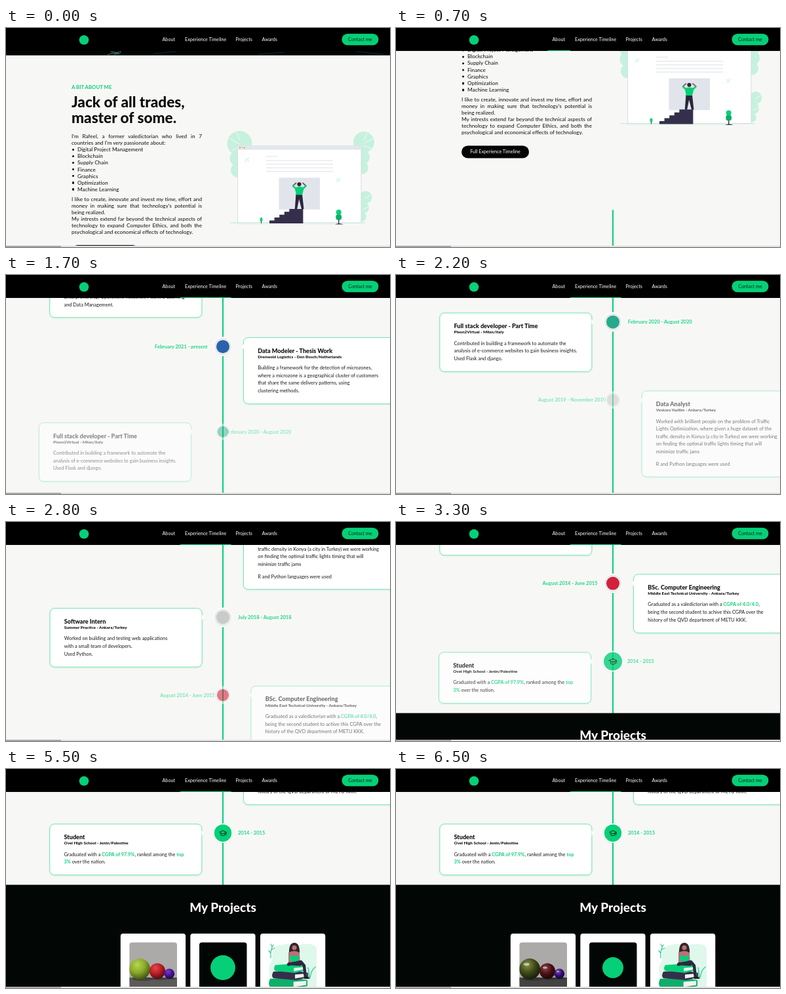
Recreate the animation shown at these times as an HTML page. Size 586 by 334 pixels, loop 6600 ms.

```html
<!DOCTYPE html>
<html lang="en">
<head>
<meta charset="utf-8">
<title>Portfolio scroll</title>
<style>
  html, body { margin: 0; width: 100%; height: 100%; overflow: hidden; background: #f7f8f6; }
  svg { display: block; width: 586px; height: 334px; }
  text, .copy { font-family: Lato, "Open Sans", sans-serif; }
  text { font-size: 7.2px; fill: #1a1a1a; }
  .copy { position: relative; font-size: 8.2px; color: #0c0c0c; }
  .copy div { position: absolute; left: 0; width: 199px; line-height: 10px; }
  .copy .full { text-align-last: justify; }
  .copy .item { left: 9px; }
  .copy .item::before { content: ""; position: absolute; left: -8px; top: 3.5px; width: 3.4px; height: 3.4px; border-radius: 50%; background: #0c0c0c; }
  .big { font-size: 22.6px; font-weight: 800; fill: #0b0b0b; }
  .title { font-size: 9.1px; font-weight: 800; fill: #0b0b0b; }
  .sub { font-size: 6.35px; font-weight: 800; fill: #0b0b0b; }
  .line { font-size: 7.4px; }
  .date { font-size: 7.5px; font-weight: 700; fill: #1fd487; }
  .hl { font-weight: 700; fill: #10cf7c; }
  .white { fill: #fff; }
</style>
</head>
<body>
<svg id="stage" viewBox="0 0 586 334" xmlns="http://www.w3.org/2000/svg"></svg>
<script>
const LOOP = 6600, GREEN = '#05d077', DARK = '#362f4b', MID = 331;

const rect = (x, y, w, h, fill, r = 0, extra = '') =>
  `<rect x="${x}" y="${y}" width="${w}" height="${h}" rx="${r}" fill="${fill}" ${extra}/>`;
const circle = (x, y, r, fill, extra = '') =>
  `<circle cx="${x}" cy="${y}" r="${r}" fill="${fill}" ${extra}/>`;
const path = (d, fill, extra = '') => `<path d="${d}" fill="${fill}" ${extra}/>`;
const stroke = (d, color, w = 1) =>
  path(d, 'none', `stroke="${color}" stroke-width="${w}" stroke-linecap="round" stroke-linejoin="round"`);
const text = (x, y, str, cls = '', extra = '') =>
  `<text x="${x}" y="${y}" class="${cls}" ${extra}>${str.replace(/\*(.+?)\*/g, '<tspan class="hl">$1</tspan>')}</text>`;

// Timeline entries alternate left and right; y is the card top on the page.
const entries = [
  { y: 443, start: 915, date: 'September 2021 - present', mark: '#c4c5c6',
    title: ['M.Sc. Computer Science and Engineering -', 'Student'], sub: 'Politecnico Di Milano - Milan/Italy',
    lines: ['Excelling in Digital Projects Management, High-Tech', 'Enterprenurship, Operations Research, Machine Learning', 'and Data Management.'] },
  { y: 573, start: 925, date: 'February 2021 - present', mark: '#2a62ad',
    title: ['Data Modeler - Thesis Work'], sub: 'Drenwold Logistics - Den Bosch/Netherlands',
    lines: ['Building a framework for the detection of microzones,', 'where a microzone is a geographical cluster of customers', 'that share the same delivery patterns, using', 'clustering methods.'] },
  { y: 703, start: 1600, date: 'February 2020 - August 2020', mark: '#27a98b',
    title: ['Full stack developer - Part Time'], sub: 'Pixon2Virtual - Milan/Italy',
    lines: ['Contributed in building a framework to automate the', 'analysis of e-commerce websites to gain business insights.', 'Used Flask and django.'] },
  { y: 822, start: 2085, date: 'August 2019 - November 2019', mark: '#c9cbca',
    title: ['Data Analyst'], sub: 'Veskara Yazilim - Ankara/Turkey',
    lines: ['Worked with brillient people on the problem of Traffic', 'Lights Optimization, where given a huge dataset of the', 'traffic density in Konya (a city in Turkey) we were working', 'on finding the optimal traffic lights timing that will', 'minimize traffic jams'],
    note: 'R and Python languages were used' },
  { y: 982, start: 2260, date: 'July 2018 - August 2018', mark: '#c9cbca',
    title: ['Software Intern'], sub: 'Summer Practice - Ankara/Turkey',
    lines: ['Worked on building and testing web applications', 'with a small team of developers.', 'Used Python.'] },
  { y: 1100.5, start: 2680, date: 'August 2014 - June 2015', mark: '#d3203c',
    title: ['BSc. Computer Engineering'], sub: 'Middle East Technical University - Ankara/Turkey',
    lines: ['Graduated as a valedictorian with a *CGPA of 4.0/4.0*,', 'being the second student to achive this CGPA over the', 'history of the QVD department of METU KKK.'] },
  { y: 1219.5, start: 3120, date: '2014 - 2015',
    title: ['Student'], sub: 'Ovel High School - Jenin/Palestine',
    lines: ['Graduated with a *CGPA of 97.9%*, ranked among the *top*', '*3%* over the nation.'] }
];

function entry(e, i) {
  const right = i % 2, x = right ? 362.5 : 66.8, tx = x + 21.7;
  const shift = (e.title.length - 1) * 10.5;
  const height = 54.2 + shift * 0.95 + 11.7 * (e.lines.length + (e.note ? 1 : 0)) + (e.note ? 6.5 : 0);
  const edge = right ? 363 : 298.5, tip = right ? -4 : 4;
  const nodeY = e.y + 13.7;
  const lineY = n => e.y + shift + 48.6 + n * 11.65;
  const icon = e.mark ? circle(0, 0, 10, e.mark) :
    path('M-5.4-1.2 0-3.8 5.4-1.2 0 1.3z', 'none', 'stroke="#0a2a1c" stroke-width="1"') +
    stroke('M-3.2 .5v2.8Q0 5 3.2 3.3V.5M5-.8v3.4', '#0a2a1c', 1);
  return `<g id="card${i}">
    ${rect(x, e.y, 232, height, '#fff', 7, 'stroke="#74dfb3" stroke-width=".9" filter="url(#glow)"')}
    ${path(`M${edge} ${nodeY - 4}l${tip} 4l${-tip} 4z`, '#fff')}
    ${e.title.map((s, n) => text(tx, e.y + 23.2 + n * 10.5, s, 'title')).join('')}
    ${text(tx, e.y + 31.4 + shift, e.sub, 'sub')}
    ${e.lines.map((s, n) => text(tx, lineY(n), s, 'line')).join('')}
    ${e.note ? text(tx, lineY(e.lines.length) + 7, e.note, 'line') : ''}
    ${text(right ? 307.5 : 354, nodeY + 2.6, e.date, 'date', right ? 'text-anchor="end"' : '')}
  </g>
  <g id="node${i}" data-y="${nodeY}">
    ${circle(0, 0, 14.8, '#fff', 'filter="url(#soft)"')}${circle(0, 0, 13.2, e.mark ? '#e9eaea' : GREEN)}${icon}
  </g>`;
}

function about() {
  const row = (y, str, cls = '') => `<div class="${cls}" style="top:${y - 5}px">${str}</div>`;
  const items = ['Digital Project Management', 'Blockchain', 'Supply Chain', 'Finance', 'Graphics', 'Optimization', 'Machine Learning'];
  const copy = [
    row(165, "I'm Rafeel, a former valedictorian who lived in 7", 'full'),
    row(175, "countries and I'm <i>very</i> passionate about:"),
    ...items.map((s, i) => row(185.2 + i * 10.1, s, 'item')),
    row(261, 'I like to create, innovate and invest my time, effort and', 'full'),
    row(271, "money in making sure that technology's potential is", 'full'),
    row(281, 'being realized.'),
    row(291, 'My intrests extend far beyond the technical aspects of', 'full'),
    row(301, 'technology to expand Computer Ethics, and both the', 'full'),
    row(311, 'psychological and economical effects of technology.')
  ].join('');
  return text(100, 92.8, 'A BIT ABOUT ME', 'hl', 'style="font-size:7.8px"') +
    text(100, 121, 'Jack of all trades,', 'big') + text(100, 145, 'master of some.', 'big') +
    `<foreignObject x="100" y="0" width="210" height="330"><div class="copy" xmlns="http://www.w3.org/1999/xhtml">${copy}</div></foreignObject>` +
    rect(100, 331, 103, 19, '#050505', 9.5) +
    text(151.5, 342.6, 'Full Experience Timeline', 'white', 'text-anchor="middle"');
}

function illustration() {
  const pale = '#c5f1de';
  const sprig = (x, y) => stroke(`M${x - 3} ${y + 3}l6-6M${x - 2.5} ${y - 2}l2 2M${x + 2.5} ${y + 2}l-2-2`, '#d8f5e9', 1.5);
  let steps = 'M402 298';
  for (let i = 0; i < 5; i++) steps += `V${293.5 - i * 4.4}h${i < 4 ? 7.6 : 21}`;
  return [
    circle(356.5, 176, 19, pale), circle(353, 199, 11.5, pale), circle(354, 217, 11, pale),
    circle(546, 174, 16, pale), circle(544, 197, 11, pale), circle(543, 213, 10, pale),
    circle(549, 258, 9.5, pale), circle(545, 274, 9, pale), circle(543, 288, 7, pale),
    stroke('M341 168l15 9M344 187l12-5M351 158l6 13M561 168l-13 7M558 184l-12-4M551 160l-5 11M557 254l-9 6M553 273l-8 4', '#f7f8f6', 1),
    rect(342, 296.5, 206, 1.6, pale, 0.8), rect(352, 299, 152, 0.8, '#d8f5e8'),
    rect(353.5, 179.5, 188.5, 117.5, '#fff', 2, 'stroke="#d5d8df" stroke-width=".9"'),
    rect(353.5, 179.3, 188.5, 6.4, '#e4e6ed', 2),
    circle(357, 182.5, 0.9, '#f55f56'), circle(360.3, 182.5, 0.9, '#f5b93e'), circle(363.6, 182.5, 0.9, '#41c955'),
    rect(397, 195.2, 18, 1.5, '#e8eaee'),
    ...[201.5, 207, 212.5, 218].map(y => rect(397, y, 102, 1.5, '#e8eaee')),
    sprig(368, 201), sprig(507, 232),
    rect(416.5, 228.3, 62.5, 48.5, '#e1e4eb'),
    path(steps + 'V298z', DARK),
    path('M442.5 253h9.5l2.5 23h-3.5l-3.8-15-3 15h-3.4z', '#29273b'),
    stroke('M438 240.5l4.5-4M457.5 240.5l-4.5-4', '#8e5448', 1.8),
    stroke('M442.5 245l-4.5-4M453 245l4.5-4', GREEN, 2.6),
    path('M440.5 243.5q7-3 14.5 0l-3 11h-9z', GREEN), circle(447.5, 238.3, 3.1, '#29273b'),
    rect(389, 293, 1, 5, DARK), rect(387.6, 289, 3.8, 6.5, GREEN, 1.9),
    rect(507, 288, 1.4, 11, DARK), rect(503.3, 284, 8.8, 9, '#0cae6a', 4), circle(507.7, 281, 4, GREEN),
    path('M502 299.5q6-3 13 0z', DARK)
  ].join('');
}

// Three spheres on a floor, in one of three materials.
function spheres(kind) {
  const balls = [[204, 305, 16, 'g'], [231, 308.3, 12, 'r'], [249.3, 312.3, 7.8, 'p']];
  const ball = ([x, y, r, hue]) => circle(x, y, r, `url(#${hue}${kind})`) +
    (kind === 'dark' ? '' : circle(x, y, r, kind === 'bump' ? 'url(#dots)' : 'url(#mesh)')) +
    (kind === 'bump' ? '' : `<ellipse cx="${x - r * 0.3}" cy="${y - r * 0.45}" rx="${r * 0.28}" ry="${r * 0.13}" fill="#fff" opacity=".55"/>`);
  const mirror = kind === 'gloss' ? `<g opacity=".9" transform="matrix(1 0 0 -1 0 640)">${balls.map(ball).join('')}</g>` : '';
  const shade = kind === 'gloss' ? '' : balls.map(([x, y, r]) =>
    `<ellipse cx="${x + r * 0.3}" cy="${y + r * 0.95}" rx="${r}" ry="${r * 0.18}" fill="#222" opacity=".45"/>`).join('');
  const floor = { gloss: '#949290', bump: '#5b5a59', dark: '#444342' }[kind];
  return `<g id="${kind}">${rect(188, 264, 73, 60, '#abaaa9')}${rect(188, 318, 73, 30, floor)}
    ${mirror}${shade}${balls.map(ball).join('')}</g>`;
}

function reader() {
  const book = (x, y, w, h, color) =>
    path(`M${x + 3} ${y}l${w * 0.6}-2 ${w * 0.4} 4v${h - 4}l${-w * 0.35} 4-${w * 0.65}-3q-4-3 0-${h - 1}z`, color) +
    path(`M${x + w * 0.68} ${y + 4.5}l${w * 0.34}-1.5v${h - 6.5}l${-w * 0.34} 3z`, '#f2f2ef');
  return [
    rect(401, 264.5, 73.5, 80, '#fff'),
    path('M413 270q18-6 34-2q25-4 27 6v60h-72v-22q-3-12 4-20q-1-14 7-22z', '#dff8ec'),
    stroke('M404 288q-1-12 4-20M404 281l-3-4M405 276l5-3M406 271l-2-4', '#36cf92', 1.3),
    book(400, 320, 57, 13, '#0fae6b'), book(405, 309, 53, 11, DARK), book(408, 299, 46, 10, GREEN),
    path('M432 283q-1-18 8-18q9 0 8 18z', '#33252f'), circle(440, 272.5, 3.5, '#b87562'),
    path('M431 280q9-5 17 0l1 18h-18z', '#b9707a'),
    stroke('M431 298l19-4 5 6 2 18M449 298l-17-1', '#2b2940', 4.5),
    path('M433 284l7 2 7-2v8l-7 2-7-2z', GREEN), rect(455, 317, 9, 3, '#222', 1.5),
    stroke('M464 318q2-12 8-16M463 319q-1-11-2-16', '#36cf92', 1.4)
  ].join('');
}

function projects() {
  const frame = x => rect(x, 251, 99.3, 120, '#fff', 4);
  return `<g transform="translate(0 1135.5)">
    ${rect(0, 176.6, 586, 220, '#020605')}
    ${text(MID, 217.5, 'My Projects', 'big', 'text-anchor="middle" style="font-size:19px;fill:#fff"')}
    ${[174.8, 281.3, 388].map(frame).join('')}
    <g clip-path="url(#shot)">${['gloss', 'bump', 'dark'].map(spheres).join('')}</g>
    ${rect(295, 264.5, 72.5, 80, '#020605', 4)}
    <circle id="badge" cx="331" cy="303" r="16" fill="${GREEN}"/>
    ${reader()}
  </g>`;
}

function nav() {
  const links = [['about', 238.5, 'About'], ['exp', 273, 'Experience Timeline'], ['', 350.5, 'Projects'], ['', 390.5, 'Awards']];
  return rect(0, 0, 586, 35, '#000') + circle(119, 18.3, 7.3, GREEN) +
    links.map(([id, x, s]) => text(x, 20.4, s, 'white', id && `id="${id}"`)).join('') +
    rect(0, 34, 35, 1, GREEN, 0, 'id="bar"') +
    rect(512.5, 8.7, 56, 17.6, GREEN, 8.8) + text(540.5, 20.3, 'Contact me', '', 'text-anchor="middle" style="fill:#06251a"');
}

const radial = (id, a, b, c) => `<radialGradient id="${id}" cx=".38" cy=".3" r=".75">
  <stop stop-color="${a}"/><stop offset=".5" stop-color="${b}"/><stop offset="1" stop-color="${c}"/></radialGradient>`;
const speckle = (id, size, color) => `<pattern id="${id}" width="${size}" height="${size}" patternUnits="userSpaceOnUse"
  patternTransform="rotate(30)">${circle(size / 2, size / 2, size * 0.27, color)}</pattern>`;

const svg = document.getElementById('stage');
svg.innerHTML = `<defs>
  <filter id="glow" x="-5%" y="-8%" width="110%" height="116%"><feDropShadow dx="0" dy=".5" stdDeviation=".8" flood-color="#05d077" flood-opacity=".3"/></filter>
  <filter id="soft" x="-20%" y="-20%" width="140%" height="140%"><feDropShadow dx="0" dy=".4" stdDeviation=".7" flood-color="#000" flood-opacity=".18"/></filter>
  <clipPath id="shot">${rect(188.4, 264.5, 72.6, 80, '#000', 4)}</clipPath>
  ${radial('ggloss', '#b4d95c', '#5f8f19', '#1f3407')}${radial('rgloss', '#e4637b', '#a0182c', '#35060d')}${radial('pgloss', '#9a58e6', '#4e149c', '#180338')}
  ${radial('gbump', '#bddc55', '#8eb02b', '#3c4d0c')}${radial('rbump', '#ee4b50', '#c01b28', '#4d080e')}${radial('pbump', '#7c3cd8', '#4c12a0', '#1c043f')}
  ${radial('gdark', '#87914f', '#3f4b17', '#12170a')}${radial('rdark', '#8d4a4a', '#4b1015', '#180506')}${radial('pdark', '#7b4cc4', '#351173', '#10032a')}
  ${speckle('dots', 2.3, 'rgba(40,40,0,.22)')}${speckle('mesh', 3, 'rgba(255,255,255,.16)')}
</defs>
<g id="page">
  ${rect(0, 0, 586, 1400, '#f7f8f6')}${rect(0, 0, 586, 41.7, '#020605')}
  ${stroke('M155 41q8-4 14-2t6-4M160 36l12 2M165 41l8-5', '#5fae9b', 0.7)}
  ${stroke('M225 39l34-3M385 40l40-3M535 36l40 4', '#153d38', 0.7)}
  ${about()}${illustration()}
  ${rect(MID - 1, 429, 2, 884, GREEN)}
  ${entries.map(entry).join('')}${projects()}
</g>
${nav()}${rect(0, 332, 586, 2, '#e2e3e1')}${rect(0, 332, 84, 2, '#a9aaa9')}`;

const $ = id => document.getElementById(id);

// Solves the standard CSS "ease" curve by bisection.
function ease(x) {
  let lo = 0, hi = 1, u = 0.5;
  for (let i = 0; i < 18; i++) {
    u = (lo + hi) / 2;
    const at = 0.75 * u * (1 - u) ** 2 + 0.75 * u * u * (1 - u) + u ** 3;
    if (at < x) lo = u; else hi = u;
  }
  return 0.3 * u * (1 - u) ** 2 + 3 * u * u * (1 - u) + u ** 3;
}

function bounce(ms) {
  const p = Math.max(0, Math.min(1, ms / 600));
  if (p < 0.6) {
    const k = ease(p / 0.6);
    return { shift: -38 + 45.6 * k, opacity: k, scale: 0.5 + 0.7 * k };
  }
  const k = ease((p - 0.6) / 0.4);
  return { shift: 7.6 * (1 - k), opacity: 1, scale: 1.2 - 0.2 * k };
}

const stops = [[50, 0], [400, 105], [650, 105], [1050, 300], [1330, 300], [1750, 480], [1980, 495],
  [2200, 645], [2400, 650], [2800, 850], [3080, 880], [3300, 1020.5], [3500, 1035], [4100, 1135.5]];

function scrollAt(t) {
  const i = stops.findIndex(s => t < s[0]);
  if (i === 0) return 0;
  if (i < 0) return stops[stops.length - 1][1];
  const [t0, a] = stops[i - 1], [t1, b] = stops[i];
  return a + (b - a) * (1 - (1 - (t - t0) / (t1 - t0)) ** 2);
}

function render(t) {
  $('page').setAttribute('transform', `translate(0 ${-scrollAt(t)})`);
  entries.forEach((e, i) => {
    const b = bounce(t - e.start), card = $('card' + i), node = $('node' + i);
    const seen = t > e.start ? 'visible' : 'hidden';
    card.setAttribute('visibility', seen);
    node.setAttribute('visibility', seen);
    card.setAttribute('opacity', b.opacity);
    node.setAttribute('opacity', b.opacity);
    card.setAttribute('transform', `translate(${i % 2 ? -b.shift : b.shift} 0)`);
    node.setAttribute('transform', `translate(${MID} ${node.dataset.y}) scale(${b.scale})`);
  });

  const active = t < 150 ? '' : t < 1700 ? 'about' : 'exp';
  $('about').setAttribute('y', active === 'about' ? 19.6 : 20.4);
  $('exp').setAttribute('y', active === 'exp' ? 19.6 : 20.4);
  $('bar').setAttribute('visibility', active ? 'visible' : 'hidden');
  $('bar').setAttribute('x', active === 'exp' ? 266 : 231.5);
  $('bar').setAttribute('width', active === 'exp' ? 77.5 : 34.5);

  const kind = t < 4900 ? 'gloss' : t < 6000 ? 'bump' : 'dark';
  for (const id of ['gloss', 'bump', 'dark']) $(id).setAttribute('visibility', id === kind ? 'visible' : 'hidden');
  const swell = t < 4300 ? 0 : Math.sin(Math.PI * Math.min(1, (t - 4300) / 2200)) ** 2;
  $('badge').setAttribute('r', 16 + 3 * swell);
}

function tick() {
  render(performance.now() % LOOP);
  requestAnimationFrame(tick);
}
tick();
</script>
</body>
</html>
```
